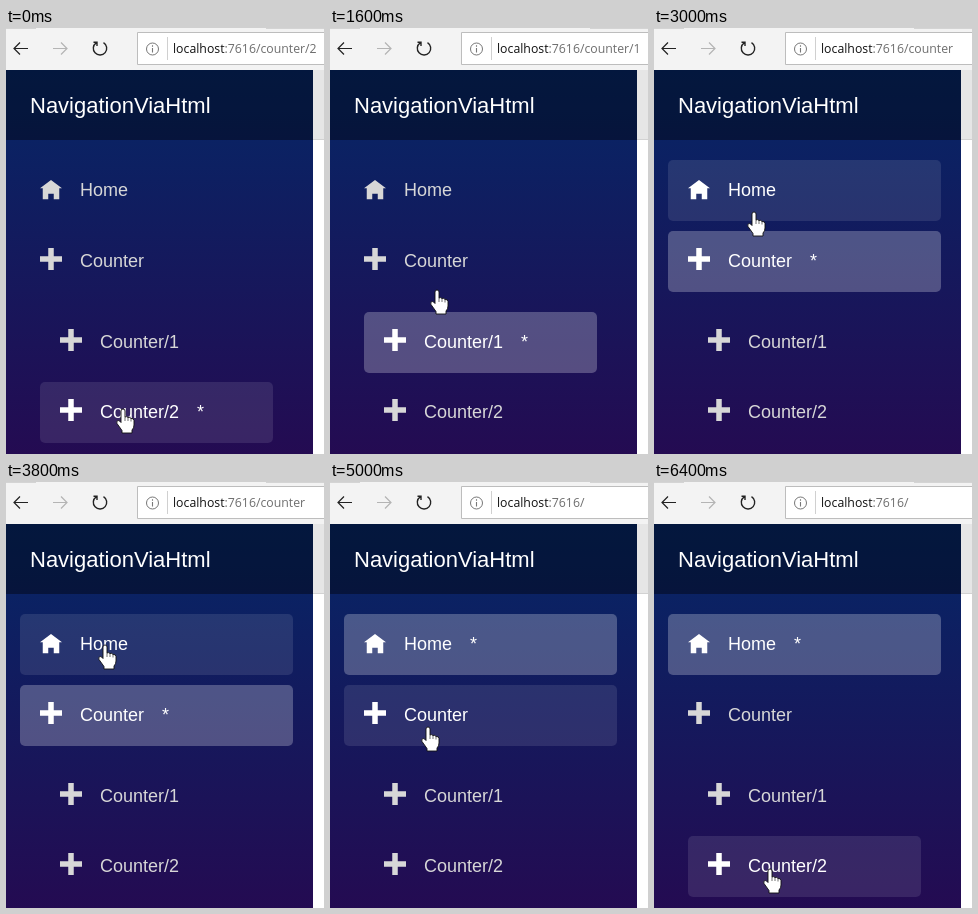
Recreate the animation shown at these times as an HTML page. Size 318 by 426 pixels, loop 6.6 s.

```html
<!DOCTYPE html>
<html lang="en">
<head>
<meta charset="utf-8">
<title>Navigation menu</title>
<style>
  html, body { margin: 0; width: 100%; height: 100%; overflow: hidden; background: #fff; }
  #stage { position: relative; width: 318px; height: 426px; overflow: hidden; font-family: "Liberation Sans", Arial, sans-serif; }
  #stage > * { position: absolute; }
  #chrome { left: 0; top: 0; background: #f3f3f3; }
  #url { left: 167px; top: 11px; font: 12.3px/20px "Open Sans", "Noto Sans", sans-serif; color: #6e6e6e; white-space: pre; }
  #url b { font-weight: 400; color: #111; }
  #bar { left: 307px; top: 42px; width: 11px; height: 69px; background: #e6e6e6; border-bottom: 1px solid #d2d2d2; }
  #side { left: 0; top: 42px; width: 307px; height: 384px; background: linear-gradient(rgb(5,39,103), rgb(36,11,82)); }
  #title { left: 0; top: 42px; width: 283px; padding-left: 24px; height: 70px; font-size: 22px; line-height: 72px; color: #fff; background: rgba(0,0,0,.4); }
  .item { left: 14px; width: 273px; height: 61px; border-radius: 5px; font-size: 18px; line-height: 61px; color: #d7d7d7; white-space: nowrap; }
  .sub { left: 34px; width: 233px; }
  .item svg { position: absolute; left: 20px; top: 17px; width: 22px; height: 22px; fill: currentColor; }
  .item .home { top: 20px; }
  .item span { position: absolute; left: 60px; }
  .item i { font-style: normal; margin-left: 18px; visibility: hidden; }
  .active { color: #fff; background: rgba(255,255,255,.25); }
  .active i { visibility: visible; }
  .hover { color: #fff; background: rgba(255,255,255,.1); }
  #hand { left: 0; top: 0; overflow: visible; }
</style>
</head>
<body>
<div id="stage">
  <svg id="chrome" width="318" height="42" fill="none" stroke="#222" stroke-width="1.2">
    <path d="M0 .5H30M260 .5H318" stroke="#d4d4d4" stroke-width="1"/>
    <path d="M22 20.5H8M14 14.5L8 20.5L14 26.5"/>
    <path d="M47 20.5H61M55 14.5L61 20.5L55 26.5" stroke="#b4b4b4"/>
    <path d="M90.2 14.8A6.7 6.7 0 1 0 97.5 14.6M87.5 14.3H91V18" stroke-width="1.4"/>
    <path d="M320 4.5H131.5V36.5H320" fill="#fff" stroke="#bdbdbd" stroke-width="1"/>
    <circle cx="146.5" cy="21" r="6" stroke="#777" stroke-width="1"/>
    <path d="M146.5 17.3V18.7M146.5 20V24.5" stroke="#777" stroke-width="1.1"/>
    <path d="M161.5 9V32" stroke="#d0d0d0" stroke-width="1"/>
  </svg>
  <div id="url"><b>localhost</b>:7616/<span id="route"></span></div>
  <div id="bar"></div>
  <div id="side"></div>
  <div id="title">NavigationViaHtml</div>
  <svg id="hand" width="1" height="1">
    <path d="M-2 2Q-2 0 0 0T2 2V8Q3.5 7 5 8.5Q7 7.8 8 9.5Q10.6 9 11 11.5V16Q11 19 9 21V24H-1V21.5L-6 14.5Q-7 12-4.8 11.5Q-3.5 11.5-2 13.5Z" fill="#fff" stroke="#111" stroke-width=".9" stroke-linejoin="round"/>
    <path d="M2 8V12M5 8.5V12M8 9.5V12.5" stroke="#333" stroke-width=".7"/>
  </svg>
</div>
<script>
const LOOP = 6600, STEP = 200, TRAVEL = 600;
const icons = {
  home: 'M4 0l-4 3h1v4h2v-2h2v2h2v-4.03l1 .03-4-3z',
  plus: 'M3 0v3h-3v2h3v3h2v-3h3v-2h-3v-3h-2z'
};
const start = { x: 117, y: 381 };
// The hand leaves for each stop at `leave` and gets there TRAVEL ms later.
const stops = [
  { leave: 400, x: 116, y: 312 },
  { leave: 1200, x: 104, y: 245 },
  { leave: 2600, x: 99, y: 163 },
  { leave: 4600, x: 98, y: 274 },
  { leave: 5400, x: 116, y: 387 }
];

const stage = document.getElementById('stage');
const hand = document.getElementById('hand');
const route = document.getElementById('route');

const items = ['Home', 'Counter', 'Counter/1', 'Counter/2'].map((label, i) => {
  const sub = label.includes('/');
  const icon = i ? 'plus' : 'home';
  const top = Math.round(132 + 70.5 * i + (sub ? 10.5 : 0));
  const el = document.createElement('div');
  el.className = sub ? 'item sub' : 'item';
  el.style.top = top + 'px';
  el.innerHTML = `<svg class="${icon}" viewBox="0 0 8 8"><path d="${icons[icon]}"/></svg><span>${label}<i>*</i></span>`;
  stage.insertBefore(el, hand);
  return { el, top, route: i ? label.toLowerCase() : '' };
});
const [home, counter, first, second] = items;

const ease = k => k * k * (3 - 2 * k);

function tipAt(t) {
  let { x, y } = start;
  for (const stop of stops) {
    const k = ease(Math.min(1, Math.max(0, (t - stop.leave) / TRAVEL)));
    x += (stop.x - x) * k;
    y += (stop.y - y) * k;
  }
  return { x: Math.round(x), y: Math.round(y) };
}

function selectedAt(t) {
  return t < 1200 ? second : t < 2600 ? first : t < 4000 ? counter : home;
}

function draw(t) {
  const { x, y } = tipAt(t);
  const selected = selectedAt(t);
  for (const item of items) {
    item.el.classList.toggle('active', item === selected);
    item.el.classList.toggle('hover', y > item.top && y < item.top + 59);
  }
  route.textContent = selected.route;
  hand.style.transform = `translate(${x}px, ${y}px)`;
}

let last = -1;
function tick() {
  const t = Math.floor(performance.now() % LOOP / STEP) * STEP;
  if (t !== last) draw(last = t);
  requestAnimationFrame(tick);
}
tick();
</script>
</body>
</html>
```
